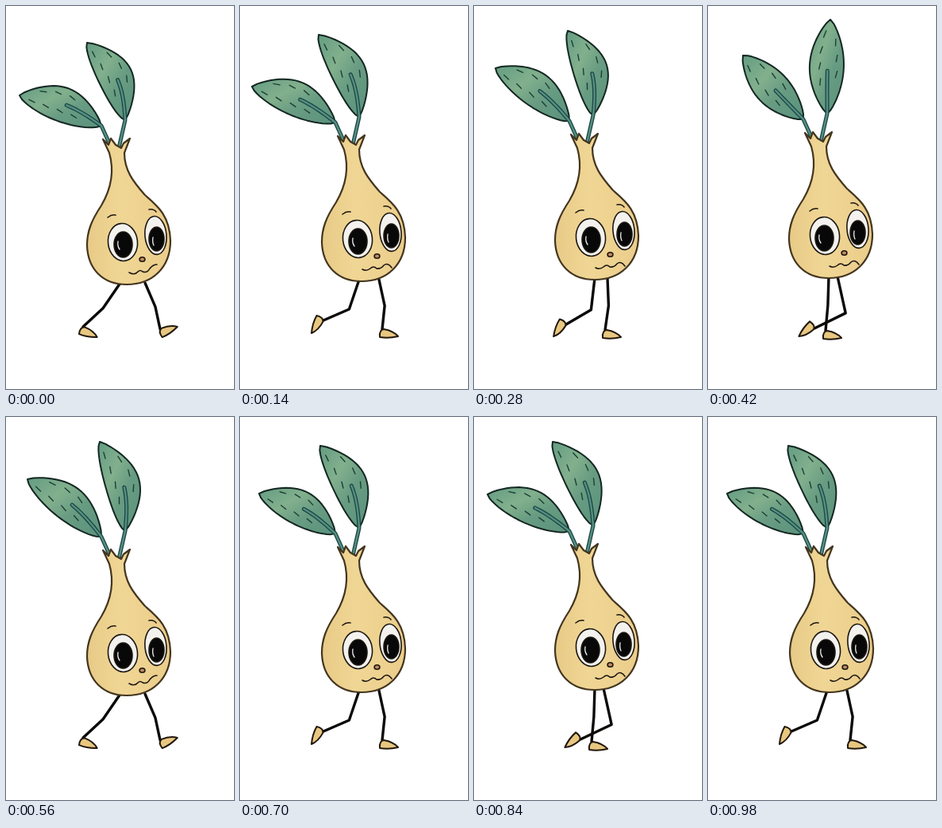
An HTML page for the animation above (1.12 s loop, 287 px wide and 480 px high).

```html
<!DOCTYPE html>
<html lang="en">
<head>
<meta charset="utf-8">
<title>Walking bulb</title>
<style>
html, body { margin: 0; width: 100%; height: 100%; overflow: hidden; background: #fff; }
svg { display: block; width: 100vw; height: 100vh; }
</style>
</head>
<body>
<svg viewBox="0 0 287 480" fill="none" stroke-linecap="round" stroke-linejoin="round">
  <defs>
    <linearGradient id="green" x1="0" y1="0" x2="1" y2="1">
      <stop offset="0" stop-color="#649c82"/>
      <stop offset=".35" stop-color="#82b08d"/>
      <stop offset=".6" stop-color="#689c82"/>
      <stop offset="1" stop-color="#5b927d"/>
    </linearGradient>
    <linearGradient id="skin">
      <stop offset="0" stop-color="#e7ca86"/>
      <stop offset=".4" stop-color="#f0d695"/>
      <stop offset="1" stop-color="#ebcd8a"/>
    </linearGradient>
  </defs>
  <g id="legs"></g>
  <g id="leaves"></g>
  <g id="bulb" stroke="#1c1712" stroke-width="1.6">
    <path fill="url(#skin)" stroke="#43351f" stroke-width="2.2"
      d="M130 184C136 205 133 228 120 250C108 268 102 282 102 300C103 330 122 349 152 349C184 349 207 328 207 294
         C206 262 190 250 175 237C160 220 149 206 149 184L156 166L148 172L145 178L138 174L132 166L129 174L122 167Z"/>
    <path d="M128 265q5-4 10-3M180 255q6-1 9 3"/>
    <ellipse cx="147" cy="296" rx="18.5" ry="23.5" fill="#f4f2ee" transform="rotate(-6 147 296)"/>
    <ellipse cx="188.5" cy="287.5" rx="13.5" ry="24" fill="#f4f2ee" transform="rotate(-5 188 288)"/>
    <g id="pupils">
      <ellipse cx="147.500" cy="299" rx="11.500" ry="16" fill="#080808"/>
      <ellipse cx="189.500" cy="292" rx="9.500" ry="15" fill="#080808"/>
      <path d="M141 295q-1 6 2 10M185 290q-1 6 1 10" stroke="#eee" stroke-width="1.300"/>
    </g>
    <ellipse cx="171.500" cy="317.500" rx="3.400" ry="2.800" fill="#c28a62"/>
    <path id="mouth"/>
  </g>
</svg>
<script>
const el = id => document.getElementById(id);
const path = (d, attrs) => `<path d="${d}" ${attrs}/>`;
const line = pts => "M" + pts.map(p => p.join(" ")).join("L");
const range = (count, fn) => Array.from({ length: count }, (_, i) => fn(i));

// Returns a map from (along 0..1, across -1..1) to a point on a bowed leaf
function leafSurface([bx, by], [tx, ty], bow) {
  const ax = tx - bx, ay = ty - by, length = Math.hypot(ax, ay), width = 21.5;
  return (along, across) => {
    const arch = Math.sin(Math.PI * Math.min(along, 1 - 1e-9));
    const offset = (bow * arch + across * width * arch ** .75) / length;
    return [bx + ax * along - ay * offset, by + ay * along + ax * offset];
  };
}

function drawLeaf(root, base, tip, bow) {
  const at = leafSurface(base, tip, bow), steps = 24;
  const edge = side => range(steps + 1, i => at(i / steps, side));
  const outline = line([...edge(1), ...edge(-1).reverse()]) + "Z";
  const marks = range(7, i => {
    const along = .3 + i * .085, across = i % 2 ? .55 : -.45;
    return line([at(along, across), at(along + .07, across + .08)]);
  }).join("");
  const rib = line([root, ...range(8, i => at(i * .065, .05))]);
  return path(outline, 'fill="url(#green)" stroke="#142722" stroke-width="2"') +
    path(marks, 'stroke="#1d3f36" stroke-width="1.4"') +
    path(rib, 'stroke="#1b4642" stroke-width="5"') +
    path(rib, 'stroke="#558f83" stroke-width="2.4"');
}

// The knee sits ahead of the hip-ankle midpoint by bend; turn rotates the foot
const leg = (hipX, x, y, bend, turn) => ({ hipX, x, y, bend, turn });

function drawLeg({ hipX, x, y, bend, turn }, lift) {
  const hipY = 347 + lift, dx = x - hipX, dy = y - hipY, reach = Math.hypot(dx, dy);
  const knee = [hipX + dx * .53 + dy / reach * bend, hipY + dy * .53 - dx / reach * bend];
  return path(line([[hipX, hipY], knee, [x, y]]), 'stroke="#0c0a08" stroke-width="3.4"') +
    path("M-3 10Q-4 1 2 0Q14 2 20 9Q8 12-3 10Z",
      `transform="translate(${x} ${y}) rotate(${turn})" fill="#e8c780" stroke="#21180d" stroke-width="2"`);
}

const smile = "M155 334q7 4 11-1q3-3 6 0q6 2 9-4q4-5 9-5";
const worry = "M153 334q5 3 10-1q4-4 8 0q5 1 9-4q5-4 10 3";

const stride = [leg(144, 97, 402, 4, 12), leg(175, 194, 405, 3, -32)];
const step = [leg(150, 105, 394, 15, 109), leg(175, 179, 405, 5, 0)];
const tuck = [leg(152, 116, 399, 17, 112), leg(168, 165, 406, 3, 0)];
const pass = [leg(152, 148, 407, 1, 0), leg(163, 134, 404, 28, 129)];

const pose = (legs, lift, leftTip, rightTip, curl = 1) => ({ legs, lift, leftTip, rightTip, curl });
const stepRest = pose(step, -4, [24, 96], [101, 36]);
const poses = [
  pose(stride, 0, [17, 112], [102, 46]),
  pose(step, -4, [15, 101], [99, 36]),
  pose(tuck, -6, [27, 78], [118, 31]),
  pose(pass, -8, [44, 62], [154, 17], -.2),
  pose(stride, 0, [27, 78], [118, 31]),
  stepRest,
  pose(pass, -7, [17, 97], [99, 31]),
  stepRest
];

let shown = -1;
function render(ms) {
  const index = Math.floor(ms / 140) % poses.length;
  if (index === shown) return;
  shown = index;
  const { legs, lift, leftTip, rightTip, curl } = poses[index];
  const sway = legs === step ? 1 : 0, look = legs === pass ? -1 : 0;
  el("bulb").setAttribute("transform", `translate(${sway} ${lift})`);
  el("pupils").setAttribute("transform", `translate(${look} 0)`);
  el("mouth").setAttribute("d", legs === stride ? smile : worry);
  el("legs").innerHTML = legs.map(l => drawLeg(l, lift)).join("");
  el("leaves").innerHTML =
    drawLeaf([130, 172 + lift], [120, 150 + lift], leftTip, 8 * curl) +
    drawLeaf([142, 178 + lift], [150, 143 + lift], rightTip, 13 * curl);
}

function tick() {
  render(performance.now());
  requestAnimationFrame(tick);
}
tick();
</script>
</body>
</html>
```
